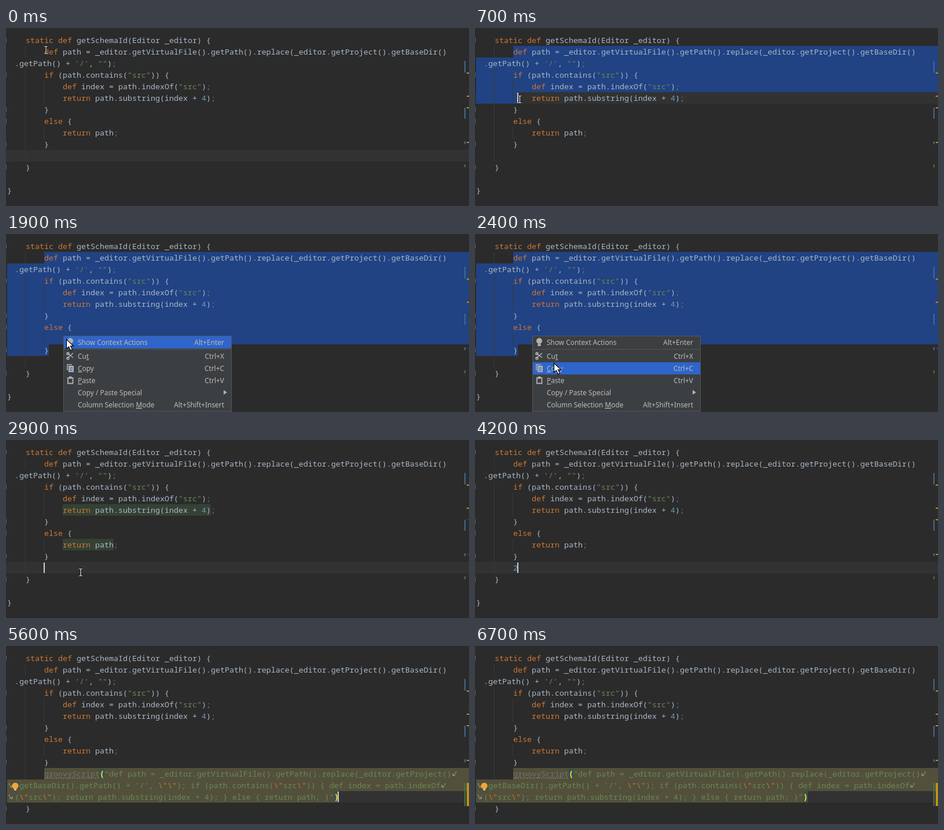
Write an HTML page that moves like this. It is 800 by 308 pixels and loops after 7.4 s.

```html
<!DOCTYPE html>
<html lang="en">
<head>
<meta charset="utf-8">
<title>Editor: code to groovyScript</title>
<style>
  html, body { margin: 0; width: 100%; height: 100%; overflow: hidden; background: #2b2b2b; }
  svg { display: block; width: 800px; height: 308px; }
  .code { font: 13.333px "Noto Sans Mono", "DejaVu Sans Mono", monospace; fill: #a9b7c6; }
  .menu { font: 11.9px "Noto Sans", "Open Sans", sans-serif; fill: #bbbbbb; }
  .k, .e { fill: #cc7832; }
  .s { fill: #6a8759; }
  .n { fill: #6897bb; }
  .d { fill: #72737a; }
  .b { fill: #ffef28; font-weight: 700; }
  .u { text-decoration: underline; }
  .end { text-anchor: end; }
</style>
</head>
<body>
<svg id="stage" viewBox="0 0 800 308"></svg>
<script>
(() => {
const LOOP = 7400, STEP = 100, CHAR = 8, LINE = 20, LEFT = 2, WRAP = 15;
const stage = document.getElementById('stage');

const BODY = [
  [34, 'static def getSchemaId(Editor _editor) {'],
  [66, 'def path = _editor.getVirtualFile().getPath().replace(_editor.getProject().getBaseDir()'],
  [WRAP, `.getPath() + '/', "");`],
  [66, 'if (path.contains("src")) {'],
  [98, 'def index = path.indexOf("src");'],
  [98, 'return path.substring(index + 4);'],
  [66, '}'],
  [66, 'else {'],
  [98, 'return path;'],
  [66, '}']
];
const SCRIPT = [
  [170, '"def path = _editor.getVirtualFile().getPath().replace(_editor.getProject()'],
  [WRAP, `.getBaseDir().getPath() + '/', \\"\\"); if (path.contains(\\"src\\")) { def index = path.indexOf`],
  [WRAP, '(\\"src\\"); return path.substring(index + 4); } else { return path; }"']
];

// mouse keys: time, x, y, shape, glide to the next key
const MOUSE = [
  [0, 69, 38, 'beam', false], [300, 69, 38, 'beam', true], [500, 71, 75, 'beam', true],
  [900, 84, 172, 'beam', true], [1000, 87, 186, 'beam', true], [1100, 89, 194, 'beam', true],
  [1200, 97, 179, 'beam', false], [1500, 98, 176, 'arrow', true], [1700, 100, 178, 'arrow', false],
  [1900, 104, 182, 'arrow', true], [2400, 136, 223, 'arrow', false],
  [2700, 136, 227, 'beam', true], [2900, 129, 229, 'beam', false], [3200, 0, 0, '', false]
];

const rowTop = row => 11 + row * LINE;
const esc = s => s.replace(/&/g, '&amp;').replace(/</g, '&lt;');
const span = (cls, s) => `<tspan class="${cls}">${esc(s)}</tspan>`;
const rect = (x, y, w, h, fill, extra = '') =>
  `<rect x="${x}" y="${y}" width="${w}" height="${h}" fill="${fill}" ${extra}/>`;
const path = (d, stroke, w = 1, fill = 'none') =>
  `<path d="${d}" stroke="${stroke}" stroke-width="${w}" fill="${fill}"/>`;
const code = (x, row, html, cls = '') =>
  `<text class="code" x="${x}" y="${rowTop(row) + 15}"><tspan class="${cls}">${html}</tspan></text>`;
const label = (x, y, html, cls = '') =>
  `<text class="menu ${cls}" x="${x}" y="${y}">${html}</text>`;

function paint(s) {
  const kinds = /("[^"]*"|'[^']*')|\b(static|def|if|else|return)\b|\b(\d+)\b|(;)/g;
  let out = '', at = 0;
  for (const m of s.matchAll(kinds)) {
    out += esc(s.slice(at, m.index)) + span(m[1] ? 's' : m[2] ? 'k' : m[3] ? 'n' : 'd', m[0]);
    at = m.index + m[0].length;
  }
  return out + esc(s.slice(at));
}

const paintString = s =>
  s.split(/(\\")/).map(p => p === '\\"' ? span('e', p) : esc(p)).join('');

function mouseAt(t) {
  let i = MOUSE.length - 1;
  while (MOUSE[i][0] > t) i--;
  const [t0, x, y, shape, glide] = MOUSE[i];
  if (!glide) return { x, y, shape };
  const [t1, x1, y1] = MOUSE[i + 1];
  const f = (t - t0) / (t1 - t0);
  return { x: x + (x1 - x) * f, y: y + (y1 - y) * f, shape };
}

function dragEnd(m) {
  const row = Math.min(9, Math.max(1, Math.floor((m.y - 11) / LINE)));
  const [x0, s] = BODY[row];
  const base = row === 2 ? WRAP : LEFT;
  const x = base + Math.round((m.x - base) / CHAR) * CHAR;
  return { row, x: Math.min(x, x0 + s.length * CHAR) };
}

// fill between two text positions, row by row
function band(r1, x1, r2, x2, fill) {
  let out = '';
  for (let r = r1; r <= r2; r++) {
    const a = r === r1 ? x1 : LEFT, b = r === r2 ? x2 : 800;
    if (b > a) out += rect(a, rowTop(r), b - a, LINE, fill);
  }
  return out;
}

const caret = (row, x) => rect(x - 1, rowTop(row) + 1, 2, 18, '#d0d0d0');

function guides(last) {
  const line = (x, a, b) => rect(x, a, 1, b - a, '#393939');
  return line(33, 31, 51) + line(33, 71, last) + line(65, 91, 131) + line(65, 171, 191);
}

function margin(t) {
  const long = t >= 4300;
  const dim = t >= 1900 && t < 3100;
  let out = [21, 81, 141, 161, 201, long ? 281 : 241].map(y => rect(0, y - 4, 1, 8, '#606366')).join('');
  out += [[57, 20], [138, 19], [196, 5]].map(([y, h]) => rect(792, y, 2, h, '#43698d')).join('');
  out += rect(792, long ? 237 : 236, 2, long ? 40 : 5, '#447152');
  for (const y of [77, 117, 137, 197])
    out += rect(796, y, 4, 2, dim && y > 120 ? '#344134' : '#be9117');
  if (t >= 5000) out += rect(796, 237, 4, 40, '#be9117');
  return out;
}

function script(t) {
  const warn = t >= 5000, done = t >= 4700;
  let out = '';
  if (warn) out += band(10, 66, 12, 575, '#52503a');
  if (!done) out += band(10, 178, 12, 559, '#214283');
  if (done) out += rect(162, 211, 8, 20, '#3b514d') + rect(567, 251, 8, 20, '#3b514d');
  out += code(66, 10, 'groovyScript', warn ? 'd' : '');
  if (warn) out += `<path d="M66 228.5H162" stroke="#a09d84" stroke-dasharray="2 2"/>`;
  out += code(162, 10, '(', done ? 'b' : '') + code(567, 12, ')', done ? 'b' : '');
  SCRIPT.forEach(([x, s], i) => out += code(x, 10 + i, paintString(s), 's'));
  for (const [x, y] of [[771, 217], [752, 237]])
    out += path(`M${x + 6} ${y}q3 3-5 7m0-4v4h4`, '#a0a6ab');
  for (const y of [237, 257])
    out += path(`M6 ${y}q-2 4 5 7m0-4v4h-4`, '#a0a6ab');
  if (t >= 5600)
    out += '<circle cx="16" cy="242" r="5.5" fill="#f2a633"/>' + rect(14, 247, 4, 3, '#b9bcbf');
  return out;
}

function menu(m, t) {
  const rows = [
    [187, 'Show Context Actions', 'Alt+Enter'],
    [211, 'Cu<tspan class="u">t</tspan>', 'Ctrl+X'],
    [232, '<tspan class="u">C</tspan>opy', 'Ctrl+C'],
    [253, '<tspan class="u">P</tspan>aste', 'Ctrl+V'],
    [274, 'Copy / Paste Special', ''],
    [295, 'Column Selection <tspan class="u">M</tspan>ode', 'Alt+Shift+Insert']
  ];
  const grey = '#afb1b3';
  let out = rect(99.5, 176.5, 290, 140, '#3c3f41', 'stroke="#555759"');
  out += rect(100, 199, 289, 1, '#515355') + rect(100, 306, 289, 1, '#515355');
  for (const [y, name, key] of rows) {
    if (t >= 1900 && m.y >= y - 10 && m.y < y + 11) out += rect(100, y - 10, 289, 21, '#2f65ca');
    out += label(124, y + 5, name) + label(377, y + 5, key, 'end');
  }
  out += `<circle cx="111" cy="185" r="5" fill="${grey}"/>` + rect(108.5, 190, 5, 4, grey);
  out += path('M106 206l10 8M106 215l10-9', grey, 1.6) +
    `<g fill="none" stroke="${grey}" stroke-width="1.5"><circle cx="107" cy="207" r="2"/><circle cx="107" cy="215" r="2"/></g>`;
  out += path('M106 236v-10h8', grey, 1.6) + rect(108, 228, 9, 11, grey) +
    path('M110 231.5h5m-5 2.5h5m-5 2.5h5', '#2f65ca');
  out += path('M107 249h8.5v9.5h-8.5z', grey, 1.8) + rect(109, 246.5, 4.5, 4, grey);
  return out + path('M376 270l6 4-6 4z', 'none', 0, grey);
}

function popup() {
  return rect(59.5, 231.5, 506, 42, '#46484a', 'stroke="#616365"') +
    rect(60, 232, 505, 21, '#113a5c') +
    code(66, 11, 'groovyScript') +
    label(66, 267, 'Press Enter to insert, Tab to replace');
}

function pointer({ x, y, shape }) {
  if (shape === 'beam') {
    const d = `M${x - 3} ${y - 6}h6m-3 0v12m-3 0h6`;
    return path(d, '#000', 3) + path(d, '#fff', 1.2);
  }
  if (shape === 'arrow')
    return path(`M${x + .5} ${y + .5}v16l4-3.5 3 6.5 3-1.4-3-6.3h5.2z`, '#000', 1.2, '#fff');
  return '';
}

function draw(t) {
  const m = mouseAt(t);
  const selected = t >= 400 && t < 2800;
  const long = t >= 4300;
  const end = t < 1100 ? dragEnd(m) : { row: 9, x: 74 };
  const menuOpen = t >= 1500 && t < 2700;
  let row = 10;
  if (t >= 300 && t < 2800) row = end.row;
  if (long) row = 12;

  let out = rect(0, 0, 800, 308, '#2b2b2b');
  if (!menuOpen) out += rect(0, rowTop(row), 800, LINE, '#323232');
  if (t >= 2800 && t < 3100)
    out += rect(98, 111, 256, LINE, '#344134') + rect(98, 171, 88, LINE, '#344134');
  if (selected) out += band(1, 66, end.row, end.x, '#214283');
  out += guides(long ? 271 : 231);
  BODY.forEach(([x, s], r) => out += code(x, r, paint(s)));
  out += code(34, long ? 13 : 11, '}');
  if (!long) out += code(LEFT, 13, '}');
  if (long) out += script(t);
  if (t >= 3600 && !long) out += code(66, 10, '2', 'n');

  if (t >= 300 && t < 1400) out += caret(end.row, end.x);
  else if (t >= 2800 && t < 3300) out += caret(10, 66);
  else if (t >= 3600 && t < 4300) out += caret(10, 74);
  else if (t >= 4300 && t < 4700) out += caret(12, 559);
  else if (t >= 4700 && t < 5700 || t >= 6200 && t < 6700) out += caret(12, 574);

  out += margin(t);
  if (menuOpen) out += menu(m, t);
  if (t >= 3700 && t < 4200) out += popup();
  stage.innerHTML = out + pointer(m);
}

const start = performance.now();
let shown = -1;
function tick() {
  const t = Math.floor(((performance.now() - start) % LOOP) / STEP) * STEP;
  if (t !== shown) draw(shown = t);
  requestAnimationFrame(tick);
}
tick();
})();
</script>
</body>
</html>
```
